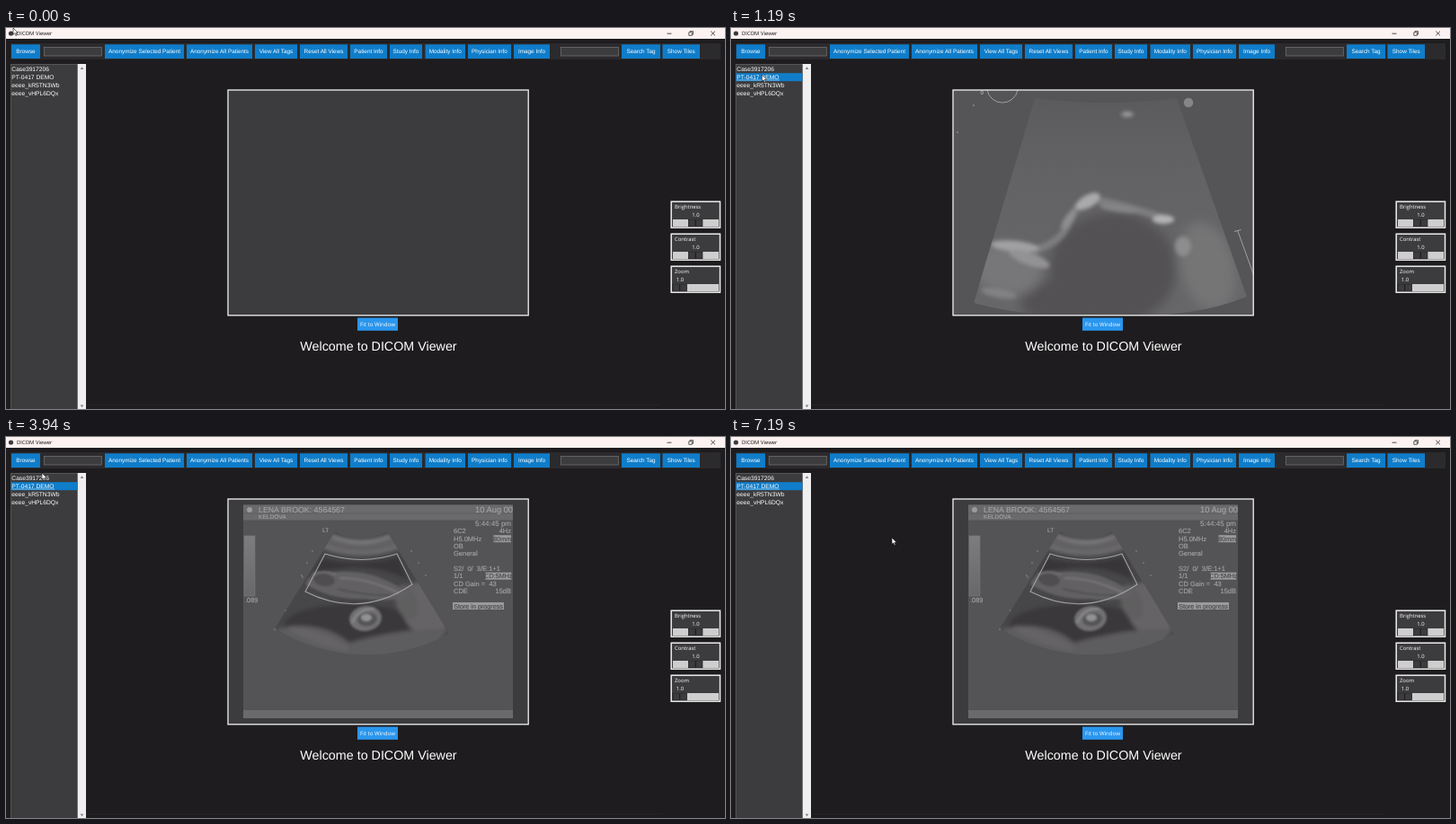
These frames come from a looping animation (800 by 424 pixels, 8000 ms). An HTML page:

```html
<!DOCTYPE html>
<html lang="en">
<head>
<meta charset="utf-8">
<title>DICOM Viewer</title>
<style>
html, body { margin: 0; width: 100%; height: 100%; overflow: hidden; background: #1e1c1e; }
svg { display: block; width: 800px; height: 424px; text-rendering: geometricPrecision; }
text { font-family: "Liberation Sans", Arial, sans-serif; fill: #fff; white-space: pre; }
.ui { font-family: "Open Sans", sans-serif; }
.scan text { fill: #a3a2a4; font-size: 7.4px; stroke: #a3a2a4; stroke-width: .15px; }
.scan .inv { fill: #4a494b; stroke: #4a494b; }
</style>
</head>
<body>
<svg id="stage" viewBox="0 0 800 424" xmlns="http://www.w3.org/2000/svg"></svg>
<script>
const LOOP = 8000, TICK = 62.5;
const BLUE = '#0f7dca', PANEL = '#3c3b3d';
const stage = document.getElementById('stage');

const rect = (x, y, w, h, fill, extra = '') =>
  `<rect x="${x}" y="${y}" width="${w}" height="${h}" fill="${fill}" ${extra}/>`;
const text = (s, x, y, size, extra = '') =>
  `<text x="${x}" y="${y}" style="font-size:${size}px" ${extra}>${s}</text>`;
const path = (d, fill, extra = '') => `<path d="${d}" fill="${fill}" ${extra}/>`;
const line = (d, color, w = 1) => path(d, 'none', `stroke="${color}" stroke-width="${w}"`);
const oval = (x, y, rx, ry, fill, turn = 0, extra = '') =>
  `<ellipse cx="${x}" cy="${y}" rx="${rx}" ry="${ry}" fill="${fill}" transform="rotate(${turn} ${x} ${y})" ${extra}/>`;
const MID = 'text-anchor="middle"', END = 'text-anchor="end"';

function titleBar() {
  return rect(0, 0, 800, 12, '#fcf2f2')
    + '<circle cx="5.5" cy="6" r="2.6" fill="#3b3b3b"/>'
    + text('DICOM Viewer', 12, 8.4, 5.9, 'class="ui" style="fill:#111"').replace('" class="ui" style="', ';').replace('<text', '<text class="ui"')
    + line('M735.5 6.2H740.5M784.2 3.6L789 8.4M789 3.6L784.2 8.4', '#222', .8)
    + line('M759.8 4.8H763.3V8.3H759.8ZM761 4.5V3.6H764.5V7.2H763.6', '#222', .7);
}

function toolbar() {
  const buttons = [
    ['Browse', 6, 38], ['Anonymize Selected Patient', 110, 198],
    ['Anonymize All Patients', 201, 274], ['View All Tags', 277, 324],
    ['Reset All Views', 327, 380], ['Patient Info', 383, 424],
    ['Study Info', 427, 463], ['Modality Info', 466.5, 511],
    ['Physician Info', 514, 562], ['Image Info', 565, 605],
    ['Search Tag', 685, 728], ['Show Tiles', 730.5, 772]
  ];
  const entry = x => rect(x, 21.5, 64, 9.5, PANEL, 'stroke="#777678" stroke-width=".7"');
  return rect(5, 17, 790, 18, '#2b2a2c') + entry(42.3) + entry(617.3)
    + buttons.map(([s, a, b]) => rect(a, 18.3, b - a, 15.7, BLUE)
      + text(s, (a + b) / 2, 28.4, 6.4, MID)).join('');
}

function patientList() {
  const names = ['Case3917206', 'PT-0417 DEMO', 'eeee_kR5TN3Wb', 'eeee_vHPL6DQx'];
  return rect(5.3, 40.3, 74.4, 384, PANEL, 'stroke="#6d6c6e" stroke-width=".6"')
    + rect(79.8, 40, 9.2, 384, '#f0eff0')
    + path('M82.6 46L84.5 43.2L86.4 46ZM82.6 419.5H86.4L84.5 422.3Z', '#858485')
    + `<g id="pick">${rect(5.6, 50.2, 73.8, 9, BLUE)}${line('M6.3 58H54', '#fff', .5)}</g>`
    + names.map((s, i) => text(s, 6.3, 47.9 + 9 * i, 6.7)).join('');
}

function slider(label, y, x) {
  return rect(740.2, y + .7, 54.3, 29, PANEL, 'stroke="#efeeef" stroke-width="1.5"')
    + text(label, 744, y + 8.8, 5.9, 'class="ui"')
    + text('1.0', x + 8, y + 17.4, 5.9, 'class="ui" text-anchor="middle"')
    + rect(742, y + 20.5, 51, 8, '#cfcecf')
    + rect(x, y + 20.8, 15.4, 7.4, PANEL, 'stroke="#1d1c1e" stroke-width=".8"')
    + line(`M${x + 7.7} ${y + 21.2}v6.6`, '#141315', .9);
}

// Wide sector view
function sectorScan() {
  const sector = 'M338 78Q417 88 496 78L574 299Q520 322 422 322Q325 322 270 306Z';
  return `<g id="sector" clip-path="url(#frame)">${rect(247, 69, 335, 252, '#555456')}`
    + `<g clip-path="url(#wide)">${path(sector, 'url(#tissue)')}
      <g filter="url(#soft6)">
        ${oval(425, 268, 70, 62, '#525153')}
        ${oval(372, 305, 50, 26, '#525153')}
        ${oval(530, 265, 30, 50, '#757476', -15)}
        ${oval(308, 268, 38, 30, '#777678', 12)}
      </g>
      <g id="valve" filter="url(#soft3)">
        ${path('M335 248Q365 240 374 220Q386 190 402 190Q450 200 488 214', 'none', 'stroke="#7e7d7f" stroke-width="8"')}
        ${oval(397, 193, 15, 7, '#aaa9ab', -30)}
        ${oval(376, 213, 13, 5, '#8e8d8f', -55)}
        ${oval(432, 201, 22, 4, '#858486', 8)}
        ${oval(481, 213, 12, 5, '#b4b3b5')}
        ${oval(316, 243, 27, 6, '#a1a0a2', 5)}
        ${oval(332, 257, 24, 7, '#939294', 20)}
        ${oval(503, 243, 9, 11, '#8d8c8e')}
        ${oval(298, 295, 20, 5, '#828183', 10)}
        ${oval(441, 96, 7, 3, '#9b9a9c')}
      </g></g>`
    + '<circle cx="509" cy="83" r="5.3" fill="#858486"/>'
    + line('M285 69A17.3 17.3 0 0 0 319 69M560 226.5L567.5 224.5M563.7 225.5L582 276', '#a9a8aa', .9)
    + text('0', 277.5, 73.5, 6, 'opacity=".75"')
    + '<circle cx="270" cy="86" r=".8" fill="#aaa"/><circle cx="252" cy="116" r=".8" fill="#aaa"/></g>';
}

// Curved view with its readouts
function fanScan() {
  const fan = 'M366 105A57 57 0 0 0 424 105L493 219A192 192 0 0 1 299 213Z';
  const readout = [
    ['6C2', '4Hz', 107.4], ['H5.0MHz', '', 115.8], ['OB', '', 124.2], ['General', '', 132.4],
    ['S2/  0/  3/E:1+1', '', 149], ['1/1', '', 157.4], ['CD Gain =  43', '', 165.8], ['CDE', '15dB', 174.2]
  ];
  const boxed = (s, x, y, w) => rect(x, y, w, 8, '#9a999b')
    + text(s, x + w / 2, y + 6.6, 7.2, 'class="inv" text-anchor="middle"');
  const dots = [[341, 127], [335, 140], [329, 154], [330, 156], [311, 193], [305, 212], [299, 214], [451, 127], [459, 140], [467, 154]];
  return `<g id="fanScan" class="scan">${rect(264, 75.5, 300, 237.5, '#545355')}`
    + rect(264, 75.5, 300, 17, '#6a696b') + rect(264, 84.6, 300, .8, '#5d5c5e')
    + rect(264, 304, 300, 9, '#6a696b')
    + '<circle cx="271" cy="81" r="3" fill="#9b9a9c"/>'
    + text('LENA BROOK: 4564567', 281, 83.9, 8.8)
    + text('10 Aug 00', 564, 83.9, 9.3, END)
    + text('KELDOVA', 281, 91, 6.6)
    + text('', 562, 99, 8, 'id="clock" text-anchor="end"')
    + readout.map(([a, b, y]) => text(a, 498, y, 7.5) + text(b, 562, y, 7.5, END)).join('')
    + boxed('80mm', 542.5, 109.2, 19.5) + boxed('CD:5MHz', 533.5, 150.7, 28.8)
    + boxed('Store in progress', 497, 184, 57)
    + rect(265, 110, 12, 67, 'url(#bar)', 'stroke="#7a797b" stroke-width=".6"')
    + text('.089', 266, 184, 7.4) + text('LT', 352, 106.3, 6.5)
    + dots.map(([x, y]) => `<circle cx="${x}" cy="${y}" r=".8" fill="#929193"/>`).join('')
    + `<g clip-path="url(#fan)">${path(fan, '#474648')}
      <g filter="url(#soft3)">
        ${path('M358 106Q395 122 432 106L441 123Q395 140 349 123Z', '#626163')}
        ${line('M363 110Q395 124 427 110', '#868587', 3)}
        ${line('M354 122Q395 138 438 122', '#747375', 3)}
        ${path('M352 135Q395 146 437 133L447 159Q420 144 385 145L342 150Z', '#373638')}
        ${oval(385, 211, 76, 25, '#3a393b')}
        ${oval(466, 192, 25, 32, '#656466', -30)}
        ${path('M300 214Q350 202 382 229Q440 212 492 214L470 245H330Z', '#5d5c5e')}
        ${oval(348, 224, 36, 6, '#656466', 20)}
        ${oval(446, 184, 12, 20, '#605f61', -20)}
      </g>
      <g id="body" filter="url(#soft1)">
        ${path('M333 164Q340 147 360 151Q392 147 417 157Q440 166 449 177Q426 184 399 180Q364 182 333 164Z', '#626163')}
        ${oval(354, 159, 12, 7, '#4f4e50', 8)}
        ${line('M371 157Q404 157 437 174', '#777678', 2.2)}
        ${line('M341 153Q354 147 367 153', '#777678', 1.5)}
        ${line('M369 169Q400 177 430 176', '#504f51', 2)}
      </g>
      <g id="blob" filter="url(#soft1)">
        ${oval(400, 202, 18, 14, '#717072', -8)}
        ${oval(402, 203, 11, 7.5, '#555456', -8)}
        ${oval(401, 201, 6, 4, '#929193')}
        ${line('M385 207Q392 190 410 191', '#8b8a8c', 2)}
      </g></g>`
    + line('M355 130Q396 143 435 130L452 164Q394 203 333 172Z', '#a3a2a4', 1.1) + '</g>';
}

const blur = n => `<filter id="soft${n}" x="-30%" y="-30%" width="160%" height="160%"><feGaussianBlur stdDeviation="${n === 1 ? 1.1 : n === 3 ? 2.2 : 6}"/></filter>`;
const defs = `<defs>
  <clipPath id="frame">${rect(247, 69, 335, 251, '#000')}</clipPath>
  <clipPath id="wide">${path('M338 78Q417 88 496 78L574 299Q520 322 422 322Q325 322 270 306Z', '#000')}</clipPath>
  <clipPath id="fan">${path('M366 105A57 57 0 0 0 424 105L493 219A192 192 0 0 1 299 213Z', '#000')}</clipPath>
  <linearGradient id="tissue" x1="0" y1="0" x2="0" y2="1"><stop offset="0" stop-color="#5b5a5c"/><stop offset=".35" stop-color="#636264"/><stop offset="1" stop-color="#676668"/></linearGradient>
  <linearGradient id="bar" x1="0" y1="0" x2="0" y2="1"><stop offset="0" stop-color="#7d7c7e"/><stop offset="1" stop-color="#68676a"/></linearGradient>
  ${blur(1)}${blur(3)}${blur(6)}</defs>`;

stage.innerHTML = defs + rect(0, 0, 800, 424, '#1e1c1e')
  + rect(90, 419, 638, .6, '#2a282a')
  + titleBar() + toolbar() + patientList()
  + rect(247, 69, 334.5, 251, PANEL) + sectorScan() + fanScan()
  + rect(247, 69, 334.2, 250.8, 'none', 'stroke="#f2f1f2" stroke-width="1.3"')
  + rect(391, 322.5, 45, 14.3, '#2a96ee')
  + text('Fit to Window', 413.5, 331.9, 6.1, 'class="ui" text-anchor="middle"')
  + text('Welcome to DICOM Viewer', 414.5, 359.4, 14.3, MID)
  + slider('Brightness', 192.5, 759.5) + slider('Contrast', 228.5, 759.5) + slider('Zoom', 264.5, 742)
  + path('M0 0V7.3L1.7 5.8L2.9 8.5L4.1 8L2.9 5.4H5.3Z', '#fff', 'id="cursor" stroke="#111" stroke-width=".6"');

const el = id => document.getElementById(id);
const [pick, sector, valve, fanView, body, blob, clock, cursor] =
  ['pick', 'sector', 'valve', 'fanScan', 'body', 'blob', 'clock', 'cursor'].map(el);

// Pointer stops: time, x, y
const stops = [
  [0, 8, 0], [562, 34.5, 52], [2812, 34.5, 52], [3000, 252, 178], [3062, 250, 174],
  [3437, 46, 17], [3625, 32, 33], [3937, 40, 40], [4750, 40, 40], [5000, 32, 62],
  [5250, 46.8, 86], [6250, 46.8, 86], [6437, 33, 52], [6562, 58, 32.5], [6750, 150, 52],
  [6875, 216, 82], [7062, 179, 110.8], [7187, 179, 112]
];

function pointerAt(t) {
  const i = stops.findIndex(s => s[0] > t);
  if (i < 0) return stops[stops.length - 1].slice(1);
  const a = stops[i - 1], b = stops[i], k = (t - a[0]) / (b[0] - a[0]);
  return [a[1] + (b[1] - a[1]) * k, a[2] + (b[2] - a[2]) * k];
}

const show = (node, on) => node.setAttribute('visibility', on ? 'visible' : 'hidden');
const shift = (node, x, y) => node.setAttribute('transform', `translate(${x.toFixed(2)} ${y.toFixed(2)})`);

function secondsAt(t) {
  if (t < 2300) return 44;
  if (t < 2780) return 45;
  if (t < 3200) return 43;
  return t < 3680 ? 44 : 45;
}

function draw(ms) {
  const t = Math.floor((ms + 3) / TICK) * TICK;
  show(pick, t >= 1125);
  show(sector, t >= 1125 && t < 2000);
  show(fanView, t >= 2000);

  const beat = Math.floor(Math.max(0, t - 1125) / 90);
  shift(valve, 1.5 * Math.sin(beat * .7), 2.5 * Math.sin(beat * .7));

  const playing = Math.min(t, 3937.5);
  const sway = Math.sin(Math.ceil((3937.5 - playing) / 90) * .3);
  shift(body, -2 * sway, 1.5 * sway);
  shift(blob, -1.5 * sway, .6 * sway);
  clock.textContent = `5:44:${secondsAt(t)} pm`;

  shift(cursor, ...pointerAt(t));
}

const start = performance.now();
function loop() {
  draw((performance.now() - start) % LOOP);
  requestAnimationFrame(loop);
}
loop();
</script>
</body>
</html>
```
